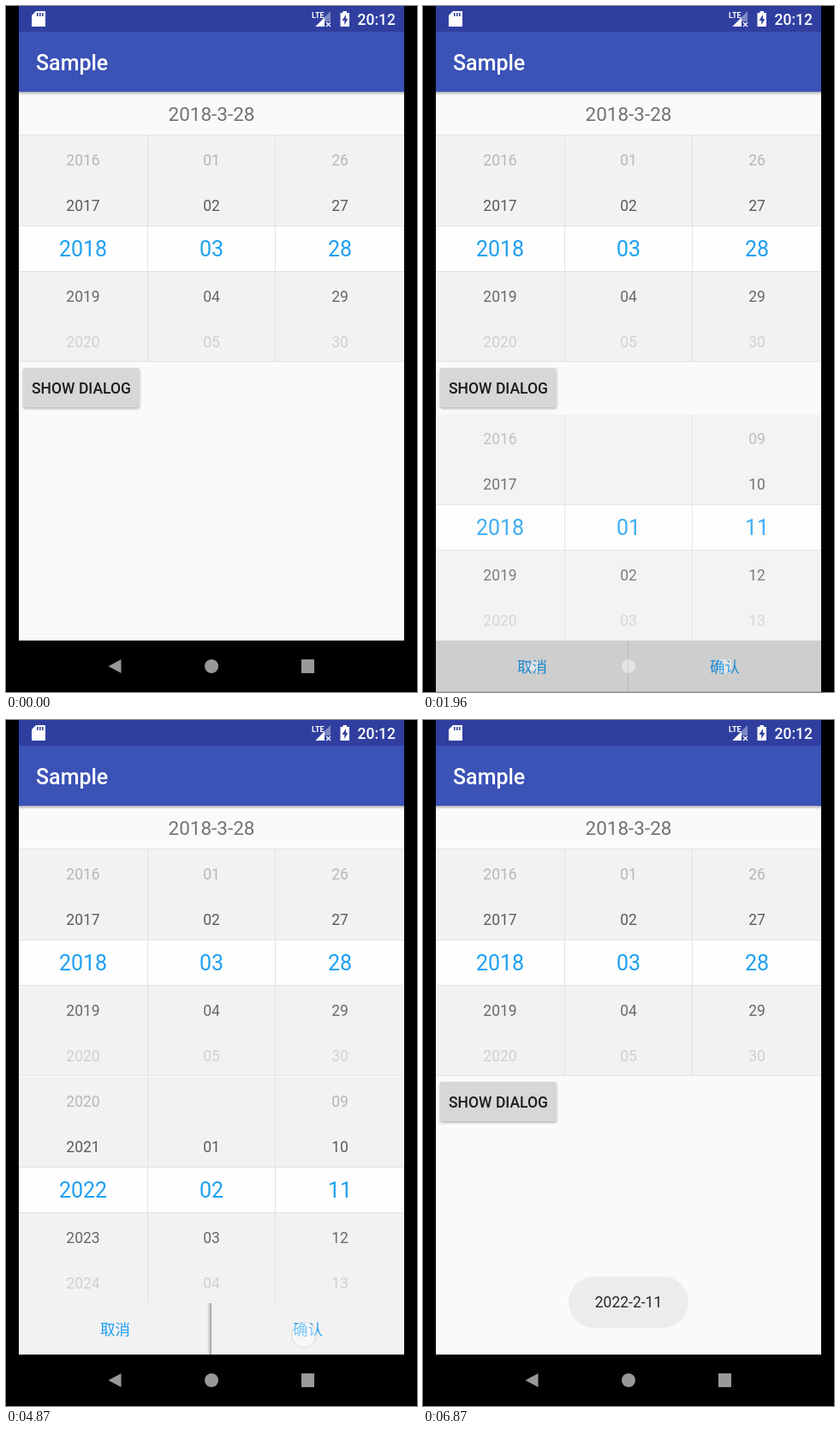
Recreate the animation shown at these times as an HTML page with a canvas. Size 480 by 800 pixels, loop 6910 ms.

```html
<!DOCTYPE html>
<html lang="en">
<head>
<meta charset="utf-8">
<title>Date picker</title>
<style>
  html, body { margin: 0; width: 100%; height: 100%; overflow: hidden; background: #000; }
  #stage { position: absolute; left: 0; top: 0; width: 480px; height: 800px; overflow: hidden; }
  #stage > * { position: absolute; }
  #screen { left: 0; top: 0; }
  #dialog { left: 15px; top: 416px; }
  #toast {
    left: 170px; top: 649px; width: 140px; height: 60px; border-radius: 30px;
    background: #ececec; color: #1c1c1c; text-align: center;
    font: 17.5px/61px Roboto, sans-serif;
  }
  #dot {
    left: -15px; top: -15px; width: 28px; height: 28px; border-radius: 50%;
    border: 1px solid rgba(150, 150, 150, .3); background: rgba(255, 255, 255, .4);
  }
</style>
</head>
<body>
<div id="stage">
  <canvas id="screen" width="480" height="800"></canvas>
  <canvas id="dialog" width="450" height="324"></canvas>
  <div id="toast">2022-2-11</div>
  <div id="dot"></div>
</div>
<script>
const LOOP = 6910, ROW = 53, CENTER = 141, HEIGHT = 264, SLIDE = 400;
const PAGE = '#fafafa', PANEL = '#f2f2f2', BAND = '#fefefe', LINE = '#e2e2e6';
const STATUS = '#303f9f', BAR = '#3b52b6', BLUE = [30, 160, 243];

const $ = id => document.getElementById(id);
const screen2d = $('screen').getContext('2d');
const dialog2d = $('dialog').getContext('2d');

const clamp = v => Math.max(0, Math.min(1, v));
const span = (t, a, b) => clamp((t - a) / (b - a));
const easeOut = p => 1 - (1 - p) ** 2;
const easeBoth = p => (1 - Math.cos(Math.PI * p)) / 2;

function rect(c, color, x, y, w, h) {
  c.fillStyle = color;
  c.fillRect(x, y, w, h);
}

function poly(c, color, ...pts) {
  c.fillStyle = color;
  c.beginPath();
  for (let i = 0; i < pts.length; i += 2) c.lineTo(pts[i], pts[i + 1]);
  c.fill();
}

function text(c, str, x, y, size, color, align = 'center', weight = 400) {
  c.font = `${weight} ${size}px Roboto, "Noto Sans CJK SC", "Noto Sans CJK", sans-serif`;
  c.textAlign = align;
  c.fillStyle = color;
  c.fillText(str, x, y);
}

// Rows grow and turn blue near the centre and fade towards both ends.
function wheel(c, x, pos, min) {
  for (let i = Math.max(min, Math.floor(pos) - 3); i <= pos + 3; i++) {
    const y = CENTER + (i - pos) * ROW;
    const near = clamp(1 - Math.abs(i - pos));
    const alpha = clamp(y > CENTER ? (HEIGHT - y) / (HEIGHT - CENTER) : y / CENTER);
    const rgb = BLUE.map(v => Math.round(v * near));
    text(c, String(i).padStart(2, '0'), x, y, 17.5 + 7.5 * near, `rgba(${rgb},${alpha})`);
  }
}

function picker(c, year, month, day) {
  c.save();
  c.beginPath();
  c.rect(0, 0, 450, HEIGHT);
  c.clip();
  rect(c, PANEL, 0, 0, 450, HEIGHT);
  rect(c, BAND, 0, 105, 450, 53);
  rect(c, LINE, 0, 105, 450, 1);
  rect(c, LINE, 0, 158, 450, 1);
  for (const x of [150, 299]) rect(c, LINE, x, 0, 1, HEIGHT);
  wheel(c, 75, year, 1970);
  wheel(c, 225, month, 1);
  wheel(c, 375, day, 1);
  c.restore();
}

function statusBar(c) {
  rect(c, STATUS, 15, 0, 450, 30);
  poly(c, '#fff', 35, 6, 46, 6, 46, 24, 30, 24, 30, 11);
  for (const x of [36, 39, 42]) rect(c, STATUS, x, 8, 1.6, 4);

  poly(c, '#7f89c3', 379, 6, 379, 18, 372, 18, 372, 24, 361, 24);
  poly(c, '#fff', 372, 13.5, 372, 24, 361.5, 24);
  text(c, 'LTE', 357, 14, 9, '#fff', 'left', 700);
  c.strokeStyle = '#fff';
  c.lineWidth = 1.3;
  c.beginPath();
  c.moveTo(374, 19); c.lineTo(379, 24);
  c.moveTo(379, 19); c.lineTo(374, 24);
  c.stroke();

  rect(c, '#fff', 390.5, 8, 10.5, 16);
  rect(c, '#fff', 393.5, 6, 4.5, 3);
  poly(c, STATUS, 397, 10, 392.5, 17, 395.3, 17, 395.3, 22, 399.3, 15, 397, 15);
  text(c, '20:12', 455, 22, 17.5, '#fff', 'right', 500);
}

function navBar(c) {
  const tone = '#999';
  poly(c, tone, 119.5, 770, 134.5, 762, 134.5, 778);
  c.beginPath();
  c.arc(240, 770, 8, 0, 7);
  c.fill();
  rect(c, tone, 345, 762, 15, 16);
}

function drawScreen() {
  const c = screen2d;
  rect(c, '#000', 0, 0, 480, 800);
  rect(c, PAGE, 15, 100, 450, 640);
  statusBar(c);
  rect(c, BAR, 15, 30, 450, 70);
  text(c, 'Sample', 35, 75, 25, '#fff', 'left', 500);
  const shade = c.createLinearGradient(0, 100, 0, 104);
  shade.addColorStop(0, 'rgba(80,80,80,.45)');
  shade.addColorStop(1, 'rgba(80,80,80,0)');
  rect(c, shade, 15, 100, 450, 4);

  text(c, '2018-3-28', 240, 134, 22.5, '#737373');
  rect(c, LINE, 15, 150, 450, 1);
  c.save();
  c.translate(15, 151);
  picker(c, 2018, 3, 28);
  c.restore();
  rect(c, LINE, 15, 414, 450, 1);

  c.save();
  c.shadowColor = 'rgba(60,60,60,.4)';
  c.shadowBlur = 3;
  c.shadowOffsetY = 1.5;
  c.fillStyle = '#d6d7d7';
  c.beginPath();
  c.roundRect(20, 422, 136, 46, 2.5);
  c.fill();
  c.restore();
  text(c, 'SHOW DIALOG', 88, 452, 17.5, '#1c1c1c', 'center', 500);
  navBar(c);
}

function drawDialog(year, month, lift) {
  const c = dialog2d, blue = `rgb(${BLUE})`;
  rect(c, PANEL, 0, 0, 450, 324);
  picker(c, year, month, 11);
  rect(c, '#dadada', 224, 264, 1, 60);
  // A pressed confirm button rises and shades its neighbour.
  const shade = c.createLinearGradient(220, 0, 225, 0);
  shade.addColorStop(0, 'rgba(90,90,90,0)');
  shade.addColorStop(1, `rgba(90,90,90,${.5 * lift})`);
  rect(c, shade, 220, 264, 5, 60);
  text(c, '取消', 112.5, 301, 17.5, blue);
  text(c, '确认', 337.5, 301, 17.5, blue);
}

const yearAt = t => 2018 + 4 * easeOut(easeBoth(span(t, 2410, 2980)));
const monthAt = t => 1 + 1.5 * easeBoth(span(t, 3170, 3840)) - .5 * easeBoth(span(t, 3880, 4200));

function touchAt(t) {
  if (t >= 1610 && t < 1780) return [90, 445];
  if (t >= 2410 && t < 2620) return [72, 640 - (yearAt(t) - 2018) * ROW];
  if (t >= 3170 && t < 3840) return [206, 657 - (monthAt(t) - 1) * ROW];
  if (t >= 4600 && t < 4910) return [348, 717];
}

function draw(t) {
  const shown = t < 4500 ? easeOut(span(t, 1820, 2050)) : 1 - easeBoth(span(t, 4920, 5200));
  const dialog = $('dialog').style;
  dialog.opacity = shown;
  dialog.transform = `translateY(${(1 - shown) * SLIDE}px)`;
  if (shown) drawDialog(yearAt(t), monthAt(t), span(t, 4600, 4700));

  $('toast').style.opacity = easeOut(span(t, 5250, 5490)) - .06 * span(t, 6780, 6870);

  const touch = touchAt(t), dot = $('dot').style;
  dot.opacity = touch ? 1 : 0;
  if (touch) dot.transform = `translate(${touch[0]}px, ${touch[1]}px)`;
}

drawScreen();
const start = performance.now();
function tick() {
  draw((performance.now() - start) % LOOP);
  requestAnimationFrame(tick);
}
tick();
</script>
</body>
</html>
```
